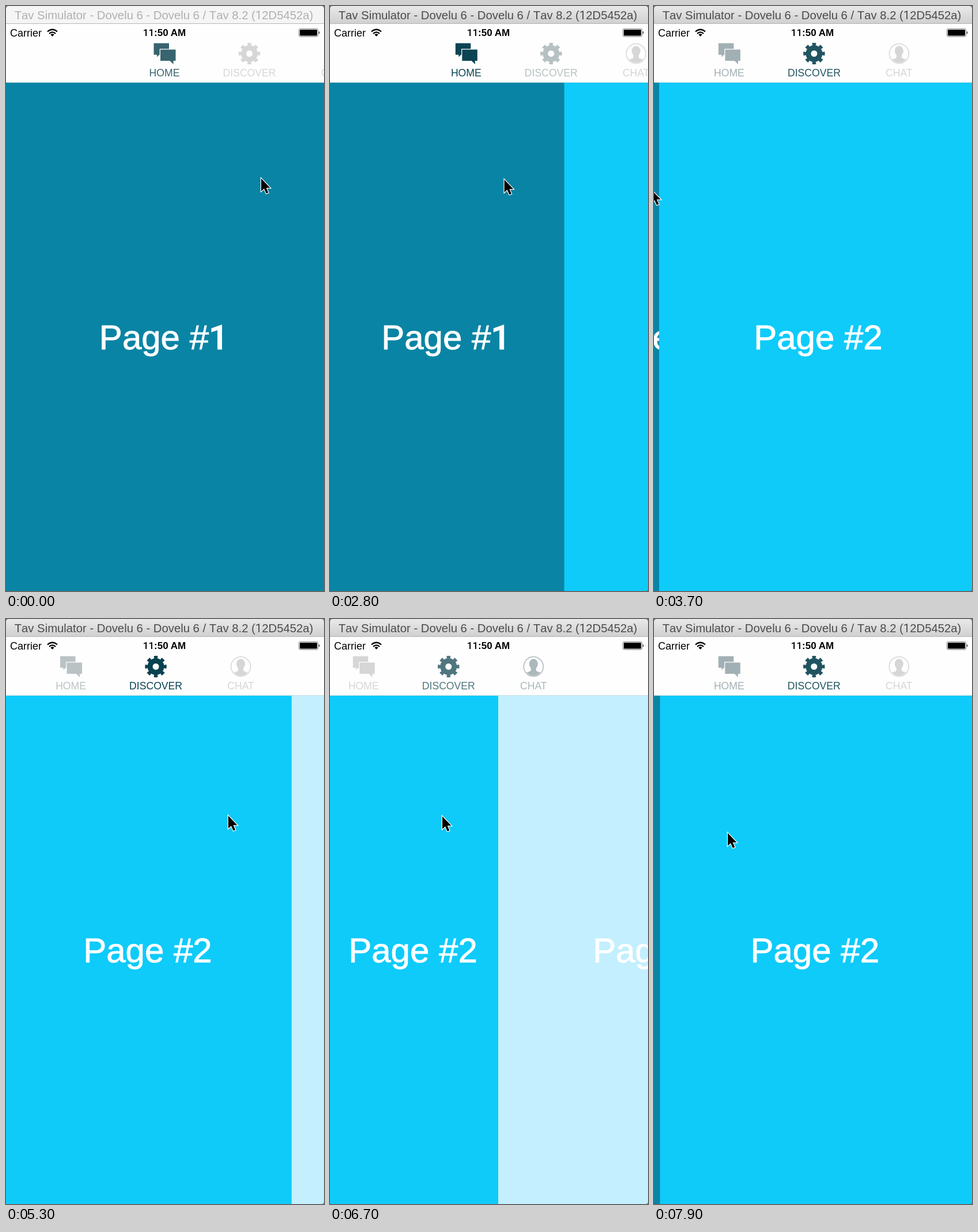
Write an HTML page that moves like this. It is 552 px wide and 1014 px high and loops after 8 s.

```html
<!DOCTYPE html>
<html lang="en">
<head>
<meta charset="utf-8">
<title>Paging tabs</title>
<style>
html, body { margin: 0; width: 100%; height: 100%; overflow: hidden; background: #fff; }
svg { display: block; font-family: "Liberation Sans", Arial, sans-serif; }
text { text-anchor: middle; }
.one { font-family: Roboto, sans-serif; }
.label { font-size: 60px; fill: #fff; stroke: #fff; stroke-width: .9; }
.label .one, .clock .one { font-weight: 500; }
.tab { fill: currentColor; font-size: 17.6px; }
.line { fill: none; stroke: currentColor; }
</style>
</head>
<body>
<svg width="552" height="1014" viewBox="0 0 552 1014">
  <defs>
    <linearGradient id="chrome" x2="0" y2="1">
      <stop stop-color="#e9e9e9"/><stop offset="1" stop-color="#d0d0d0"/>
    </linearGradient>
  </defs>

  <g id="back"><rect width="552" height="1014"/><text class="label" y="595"/></g>
  <g id="front"><rect width="552" height="1014"/><text class="label" x="276" y="595"/></g>

  <rect width="552" height="132.5" fill="#fefefe"/>
  <path d="M0 132.5H552" stroke="#c8dde3"/>

  <g class="tab">
    <path d="M-18.5 64.5h26.5v20h-17l-4 4v-4h-5.5z"/>
    <path d="M-7 75.5h26.5v19.500h-4v6l-6-6h-16.500z" stroke="#fefefe" stroke-width="2.500" paint-order="stroke"/>
    <text y="122">HOME</text>
  </g>
  <g class="tab">
    <circle class="line" cy="82.500" r="10" stroke-width="9"/>
    <circle class="line" cy="82.500" r="16.200" stroke-width="5" pathLength="16" stroke-dasharray="1 1" stroke-dashoffset=".5"/>
    <text y="122">DISCOVER</text>
  </g>
  <g class="tab">
    <circle class="line" cy="82.500" r="17" stroke-width="1.500"/>
    <ellipse cy="78" rx="7.500" ry="9"/>
    <path d="M-4.500 84V89Q-5 91-12 92.500Q-7 98.500 0 98.500T12 92.500Q5 91 4.500 89V84z"/>
    <text y="122">CHAT</text>
  </g>

  <text x="7" y="52.500" font-size="18" style="text-anchor:start">Carrier</text>
  <g fill="none" stroke="#000" stroke-width="2.200">
    <path d="M72 44.500Q80.500 37 89 44.500M75 47.800Q80.500 43 86 47.800"/>
    <path d="M77.300 49.500Q80.500 47 83.700 49.500L80.500 52.800z" fill="#000" stroke="none"/>
  </g>
  <text class="clock" x="275" y="52" font-size="17" font-weight="bold">11:50 AM</text>
  <rect x="508.500" y="39.500" width="33" height="13.500" rx="2" fill="none" stroke="#777"/>
  <rect x="510" y="41" width="30" height="10.500" rx="1"/>
  <path d="M543 43.500q2.500 2.700 0 5.500z"/>

  <rect id="bar" width="552" height="30"/>
  <path d="M0 30.500H552" stroke="#b5b5b5"/>
  <text id="title" x="274" y="22.500" font-size="20.300" style="font-kerning:none">Tav Simulator - Dovelu 6 - Dovelu 6 / Tav 8.2 (12D5452a)</text>
  <path d="M0 0H5Q0 0 0 5zM552 0V5Q552 0 547 0zM552 1014v-4q0 4-4 4z" fill="#666"/>

  <path id="cursor" d="M1 1V23L6 18.500L9.800 27L13.300 25.500L9.700 17.300H16.500z" stroke="#fff" stroke-width="2.400" paint-order="stroke"/>
</svg>
<script>
const $ = id => document.getElementById(id);
const LOOP = 8000, WIDTH = 552, PAGE = 554, TAB = 147.5;
const colors = ['#0a84a4', '#0ecbfa', '#c3efff'];
const dark = [6, 64, 79], grey = [214, 214, 214];
const tabs = [...document.querySelectorAll('.tab')];
const halfWidths = [26.5, 45, 22.5];

// [time, value] pairs
const scrollKeys = [[0, 0], [2300, 0], [2800, 145], [3300, 400], [3700, 543], [4000, PAGE],
  [4900, PAGE], [5300, 610], [5900, 735], [6700, 814], [7100, PAGE], [7750, PAGE], [7900, 543.5]];
const xKeys = [[0, 442], [500, 456], [1100, 460], [1800, 460], [2250, 456], [2800, 302], [3300, 55],
  [3700, -5], [4000, -5], [4700, 455], [4850, 455], [5300, 385], [5900, 262], [6700, 194],
  [6900, 194], [7500, 100], [7700, 103], [7900, 127]];
const yKeys = [[0, 298], [1100, 304], [1800, 304], [2800, 300], [3700, 318], [4700, 338],
  [5300, 340], [6700, 341], [7500, 368], [7900, 370]];

// Monotone cubic interpolation: smooth, without overshoot
function sample(keys, t) {
  const i = keys.findIndex(k => k[0] > t) - 1;
  if (i < 0) return keys[keys.length - 1][1];
  const slope = j => keys[j] && keys[j + 1]
    ? (keys[j + 1][1] - keys[j][1]) / (keys[j + 1][0] - keys[j][0]) : 0;
  const tangent = j => {
    const a = slope(j - 1), b = slope(j);
    return a * b > 0 ? 2 * a * b / (a + b) : 0;
  };
  const [t0, v0] = keys[i], [t1, v1] = keys[i + 1];
  const d = t1 - t0, u = (t - t0) / d, w = 1 - u;
  return v0 * (1 + 2 * u) * w * w + v1 * u * u * (3 - 2 * u)
    + d * u * w * (tangent(i) * w - tangent(i + 1) * u);
}

const footless = s => s.replace(/1/g, '<tspan class="one">1</tspan>');
const move = (el, x, y = 0) => el.setAttribute('transform', `translate(${x} ${y})`);

function showPage(group, n) {
  if (group.dataset.page == n) return;
  group.dataset.page = n;
  group.children[0].setAttribute('fill', colors[n]);
  group.children[1].innerHTML = footless(`Page #${n + 1}`);
}

function draw(t) {
  const scroll = sample(scrollKeys, t);
  const current = t < 4000 ? 0 : 1;
  const delta = scroll - current * PAGE;

  // The current page slides at half speed beneath the incoming one
  showPage($('back'), current);
  $('back').children[1].setAttribute('x', 274 - delta / 2);
  showPage($('front'), delta < 0 ? current - 1 : current + 1);
  move($('front'), delta < 0 ? -delta - WIDTH : WIDTH - delta);

  // Tab tint depends on where its left edge lies
  tabs.forEach((tab, i) => {
    const x = 275 + TAB * (i - scroll / PAGE);
    const k = Math.min(1, Math.abs(x - halfWidths[i] - 213.5) / 147.2);
    move(tab, x);
    tab.style.color = `rgb(${dark.map((c, j) => Math.round(c + (grey[j] - c) * k))})`;
  });

  const active = t >= 200;
  $('bar').setAttribute('fill', active ? 'url(#chrome)' : '#f5f5f5');
  $('title').setAttribute('fill', active ? '#4c4c4c' : '#b0b0b0');
  move($('cursor'), sample(xKeys, t), sample(yKeys, t));
}

for (const el of [$('title'), document.querySelector('.clock')]) el.innerHTML = footless(el.textContent);

const start = performance.now();
function tick() {
  draw((performance.now() - start) % LOOP);
  requestAnimationFrame(tick);
}
tick();
</script>
</body>
</html>
```
